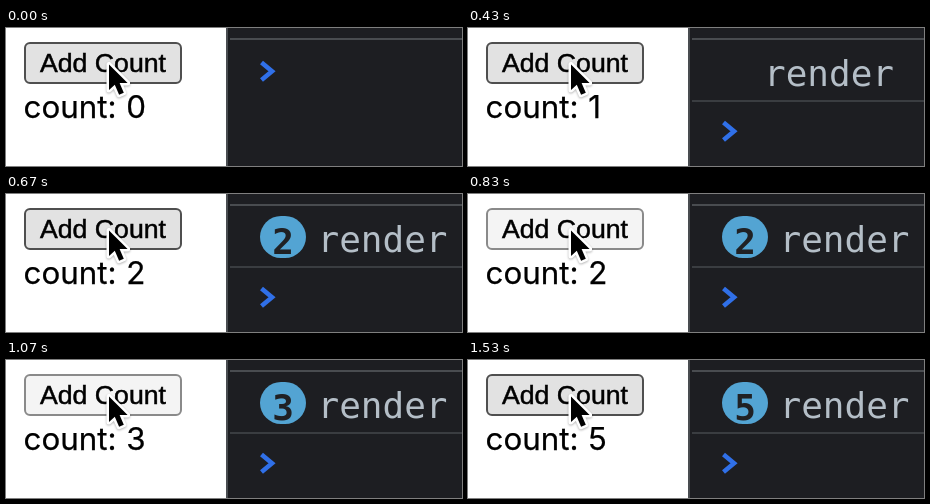
An HTML page that plays this animation: 456x138 px, repeating every 1830 ms.

```html
<!DOCTYPE html>
<html lang="en">
<head>
<meta charset="utf-8">
<title>Add Count</title>
<style>
  html, body { margin: 0; width: 100%; height: 100%; overflow: hidden; background: #fff; }
  svg { display: block; width: 456px; height: 138px; overflow: hidden; }

  .label { font: 26.67px "Liberation Sans", Arial, sans-serif; stroke: #000; stroke-width: .5; }
  .count { font: 31.3px Inter, sans-serif; stroke: #000; stroke-width: .25; }
  .log   { font: 36px "DejaVu Sans Mono", monospace; fill: #b4bec7; }
  .times { font: bold 36px "DejaVu Sans Mono", monospace; fill: #202124; text-anchor: middle; }

  .button, .digit, .logged, .repeated, .shift, .prompt, .times {
    animation: 1830ms step-end infinite;
  }
  .button   { fill: #e2e2e2; stroke: #4f4f4f; stroke-width: 2; animation-name: press; }
  .digit    { animation-name: count; }
  .times    { animation-name: repeat; }
  .logged   { animation-name: logged; }
  .repeated { animation-name: repeated; }
  .shift    { animation-name: shift; }
  .prompt   { animation-name: prompt; fill: none; stroke: #3070e8; stroke-width: 4.6; }

  @keyframes press {
    0%, 23.497%, 36.612%, 49.18%, 63.934%, 78.142%, 100% { fill: #e2e2e2; stroke: #4f4f4f; }
    20.218%, 32.786%, 45.355%, 58.469%, 71.038% { fill: #f4f4f4; stroke: #8a8a8a; }
  }
  /* Digits are stacked 200px apart, so only one is on stage. */
  @keyframes count {
    0%      { transform: none; }
    23.497% { transform: translateY(-200px); }
    36.612% { transform: translateY(-400px); }
    49.18%  { transform: translateY(-600px); }
    63.934% { transform: translateY(-800px); }
    78.142%, 100% { transform: translateY(-1000px); }
  }
  /* The console badge trails the page slightly on later clicks. */
  @keyframes repeat {
    0%      { transform: none; }
    50.819% { transform: translateY(-200px); }
    65.573% { transform: translateY(-400px); }
    83.606%, 100% { transform: translateY(-600px); }
  }
  @keyframes logged {
    0% { visibility: hidden; }
    23.497%, 100% { visibility: visible; }
  }
  @keyframes repeated {
    0% { visibility: hidden; }
    36.612%, 100% { visibility: visible; }
  }
  @keyframes shift {
    0% { transform: none; }
    36.612%, 100% { transform: translateX(15.5px); }
  }
  @keyframes prompt {
    0% { transform: none; }
    23.497%, 100% { transform: translateY(60px); }
  }
</style>
</head>
<body>
<svg viewBox="0 0 456 138">
  <rect class="button" x="19" y="15" width="156" height="40" rx="5"/>
  <text class="label" x="34" y="44">Add Count</text>
  <text class="count" x="17.5" y="90">count:</text>
  <text class="count digit">
    <tspan x="120.3" y="90">0</tspan><tspan x="120.3" y="290">1</tspan><tspan x="120.3" y="490">2</tspan><tspan x="120.3" y="690">3</tspan><tspan x="120.3" y="890">4</tspan><tspan x="120.3" y="1090">5</tspan>
  </text>

  <rect x="220" width="236" height="138" fill="#1d1e22"/>
  <rect x="220" width="2" height="138" fill="#494c50"/>
  <rect x="224" y="10" width="232" height="2" fill="#494c50"/>
  <g class="logged">
    <rect x="224" y="72" width="232" height="2" fill="#3a3d41"/>
    <text class="log shift" x="296" y="58">render</text>
  </g>
  <g class="repeated">
    <rect x="254" y="22" width="46" height="42" rx="21" fill="#53a4d3"/>
    <text class="times">
      <tspan x="277" y="60">2</tspan><tspan x="277" y="260">3</tspan><tspan x="277" y="460">4</tspan><tspan x="277" y="660">5</tspan>
    </text>
  </g>
  <path class="prompt" d="M255.5 34.5 L266 43.3 L255.5 52"/>

  <path d="M103 36.5v25.5l5.8-5.3 4.3 10 4.7-2-4.2-9.6h8z" stroke="#fff" stroke-width="5" stroke-linejoin="round" paint-order="stroke"
        style="filter: drop-shadow(0 1px 1px rgba(0,0,0,.3))"/>
</svg>
</body>
</html>
```
